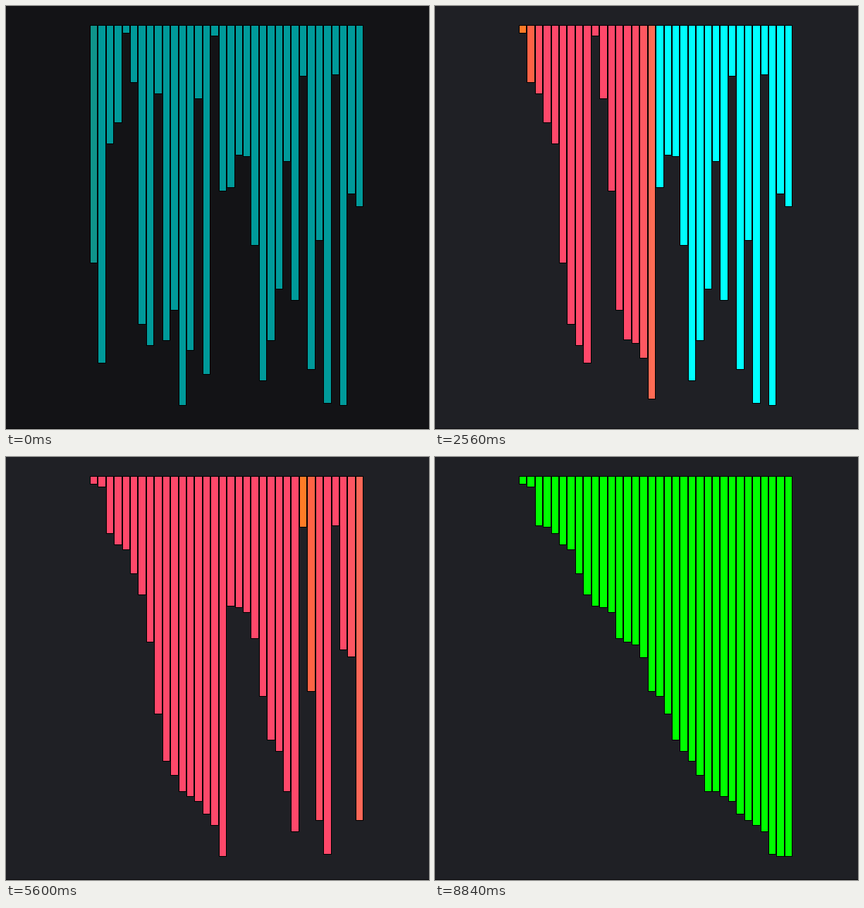
Animation of 600 by 600 pixels, one loop 8880 ms. Source, as an HTML page with a canvas:

```html
<!DOCTYPE html>
<html lang="en">
<head>
<meta charset="utf-8">
<title>Merge sort</title>
<style>
html, body { margin: 0; height: 100%; overflow: hidden; background: #1f2025; }
canvas { display: block; }
</style>
</head>
<body>
<canvas id="stage" width="600" height="600"></canvas>
<script>
const ctx = document.getElementById('stage').getContext('2d');
const LOOP = 8880, EASE_MS = 150, TOP = 28, LEFT = 119.95, PITCH = 11.42;
const CYAN = [0, 255, 255], ORANGE = [255, 152, 0], YELLOW = [255, 255, 0],
      PINK = [255, 72, 106], GREEN = [0, 255, 0];

// Bottom edge of every bar before sorting
const start = [364, 506, 195, 165, 38, 108, 451, 481, 124, 474, 431, 566,
  488, 131, 522, 42, 262, 257, 211, 213, 339, 531, 474, 401, 220, 417, 99,
  515, 332, 563, 97, 566, 266, 284];

// Pace of the sort: [ms, steps done]
const pace = [[0, 1.7], [1160, 58.7], [2560, 124.5], [3920, 186.5],
  [5600, 263.5], [6840, 316.5], [8290, 381]];

function timeOf(step) {
  let k = 1;
  while (k < pace.length - 1 && step > pace[k][1]) k++;
  const [t0, s0] = pace[k - 1], [t1, s1] = pace[k];
  return t0 + (step - s0) * (t1 - t0) / (s1 - s0);
}

const events = [];
let step = 0;

function emit(bar, color, height) {
  events.push({ at: timeOf(++step), bar, color, height });
}

function merge(a, lo, mid, hi) {
  const left = a.slice(lo, mid + 1), right = a.slice(mid + 1, hi + 1);
  left.forEach((h, i) => emit(lo + i, ORANGE, h));
  right.forEach((h, i) => emit(mid + 1 + i, YELLOW, h));
  step++;
  const placed = hi - lo + 1 === a.length ? GREEN : PINK;
  for (let k = lo; k <= hi; k++) {
    const fromLeft = left.length && (!right.length || left[0] <= right[0]);
    a[k] = (fromLeft ? left : right).shift();
    emit(k, placed, a[k]);
  }
}

function mergeSort(a, lo, hi) {
  if (lo >= hi) return;
  const mid = (lo + hi) >> 1;
  mergeSort(a, lo, mid);
  mergeSort(a, mid + 1, hi);
  merge(a, lo, mid, hi);
}
mergeSort([...start], 0, start.length - 1);

// cubic-bezier(.25, .1, .25, 1)
function ease(x) {
  if (x <= 0) return 0;
  if (x >= 1) return 1;
  const bez = (p, q, u) => 3 * p * u * (1 - u) ** 2 + 3 * q * u * u * (1 - u) + u ** 3;
  let lo = 0, hi = 1;
  for (let i = 0; i < 20; i++) {
    const u = (lo + hi) / 2;
    if (bez(.25, .25, u) < x) lo = u; else hi = u;
  }
  return bez(.1, 1, lo);
}

const still = v => ({ from: v, to: v, at: -1e4 });

function valueAt(p, t) {
  const e = ease((t - p.at) / EASE_MS);
  return p.from.map((v, i) => v + (p.to[i] - v) * e);
}

function retarget(p, to, t) {
  if (to.every((v, i) => v === p.to[i])) return;
  p.from = valueAt(p, t);
  p.to = to;
  p.at = t;
}

function draw(t) {
  const bars = start.map(h => ({ color: still(CYAN), height: still([h]) }));
  for (const e of events) {
    if (e.at > t) break;
    retarget(bars[e.bar].color, e.color, e.at);
    retarget(bars[e.bar].height, [e.height], e.at);
  }
  ctx.fillStyle = '#1f2025';
  ctx.fillRect(0, 0, 600, 600);
  ctx.fillStyle = '#0c0c0e';
  ctx.fillRect(0, 599, 600, 1);
  bars.forEach((b, i) => {
    const x = Math.round(LEFT + PITCH * i);
    const w = Math.round(LEFT + PITCH * (i + 1)) - 2 - x;
    const h = Math.round(valueAt(b.height, t)[0]) - TOP;
    ctx.fillStyle = '#000';
    ctx.fillRect(x - 1, TOP - 1, w + 2, h + 2);
    ctx.fillStyle = `rgb(${valueAt(b.color, t).map(Math.round)})`;
    ctx.fillRect(x, TOP, w, h);
  });
  // Backdrop clearing as the sort begins
  const shade = .4 * Math.max(0, 1 - t / 120);
  ctx.fillStyle = `rgba(0,0,0,${shade})`;
  ctx.fillRect(0, 0, 600, 600);
}

const begin = performance.now();
function tick() {
  draw((performance.now() - begin) % LOOP);
  requestAnimationFrame(tick);
}
tick();
</script>
</body>
</html>
```
